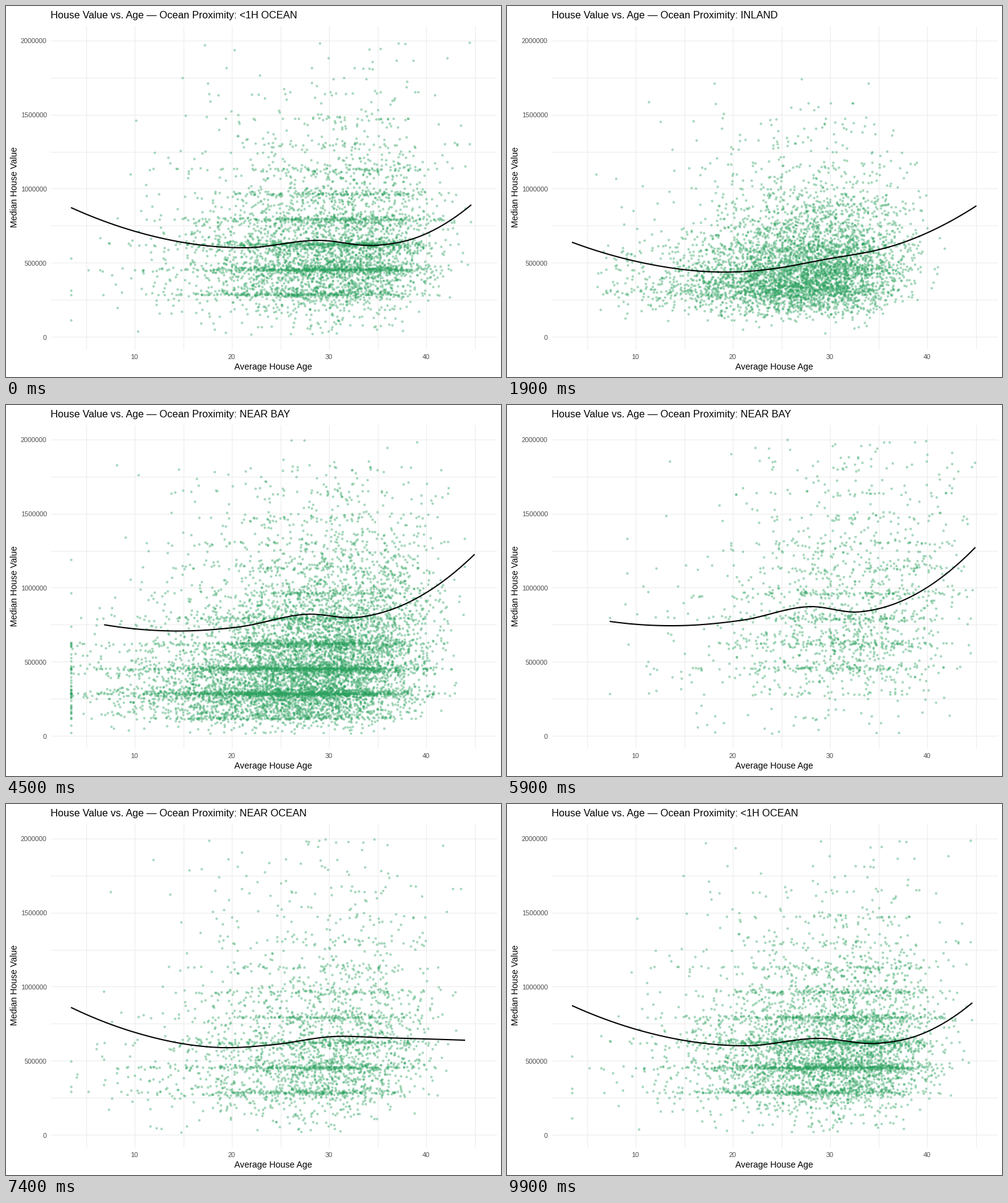
Write a matplotlib script that moves like this. It is 800x600 px and loops after 10000 ms.

```python
import numpy as np
import matplotlib.pyplot as plt
from matplotlib.animation import FuncAnimation

plt.rcParams["font.family"] = ["Liberation Sans", "DejaVu Sans"]

W, H, DPI = 800, 600, 100
PX = 72 / DPI
FRAMES, INTERVAL = 100, 100
LEFT, RIGHT, TOP, BOTTOM = 72, 793, 32, 555
GREEN = (0.173, 0.635, 0.373, 0.33)
rng = np.random.default_rng(12)


def px_x(age):
    return 50.5 + 15.69 * age


def px_y(thousands):
    return 533.6 - 0.2391 * thousands


def smooth(xs, ys, n=80):
    """Cubic Hermite curve through a few key points."""
    xs, ys = np.array(xs, float), np.array(ys, float)
    x = np.linspace(xs[0], xs[-1], n)
    i = np.clip(np.searchsorted(xs, x) - 1, 0, len(xs) - 2)
    m, h = np.gradient(ys, xs, edge_order=2), xs[i + 1] - xs[i]
    u = (x - xs[i]) / h
    y = ((1 + 2 * u) * (1 - u) ** 2 * ys[i] + u * (1 - u) ** 2 * h * m[i]
         + u * u * (3 - 2 * u) * ys[i + 1] + u * u * (u - 1) * h * m[i + 1])
    return np.column_stack([x, y])


def cloud(count, x_min, x_max, age, age_sd, median, sigma):
    """Ages lean to the left; log-normal values gather in horizontal bands."""
    value = median * np.exp(sigma * rng.normal(size=count))
    value -= 22 * np.sin(2 * np.pi * (value - 440) / 170)
    value *= np.where(rng.random(count) < 0.05, rng.random(count), 1)
    value = 10 + np.abs(1990 - np.abs(1990 - value))
    ages = age + age_sd * (9 - rng.gamma(9, size=count)) / 3
    ages += 2 * np.log(np.clip(value / median, 0.4, 2))
    x = np.maximum(x_max - np.abs(x_max - px_x(ages)), x_min)
    return np.column_stack([x, px_y(value)])


def state(name, xs, ys, count, **spread):
    return name, cloud(count, xs[0], xs[-1], **spread), smooth(xs, ys)


STATES = [
    state("<1H OCEAN",
          [105, 207, 385, 505, 600, 665, 752], [326, 364, 391, 379, 387, 374, 321.5],
          count=4800, age=29.5, age_sd=6.4, median=560, sigma=0.46),
    state("INLAND",
          [105, 207, 350, 430, 521, 640, 760], [394, 423, 439, 433, 415, 383, 323.5],
          count=8800, age=26, age_sd=7.4, median=400, sigma=0.57),
    state("NEAR BAY",
          [166, 265, 380, 490, 570, 640, 757], [350, 357, 348, 326, 334.5, 316, 230],
          count=1600, age=31, age_sd=6.6, median=800, sigma=0.46),
    state("NEAR OCEAN",
          [105, 207, 350, 430, 530, 610, 742], [329, 369, 394, 389.5, 376, 378, 382],
          count=2750, age=28, age_sd=6.7, median=560, sigma=0.54),
]
MOVES = [(8, 25), (34, 50), (58, 74), (83, 99)]

fig = plt.figure(figsize=(W / DPI, H / DPI), dpi=DPI, facecolor="white")
ax = fig.add_axes([0, 0, 1, 1], xlim=(0, W), ylim=(H, 0))
ax.axis("off")


def label(x, y, text, size, **style):
    return ax.text(x, y, text, fontsize=size * PX, **{"va": "baseline", **style})


def grid_line(xs, ys):
    ax.plot(xs, ys, color="#EBEBEB", lw=PX, zorder=1, solid_capstyle="butt")


for age in range(5, 50, 5):
    x = round(px_x(age)) + 0.5
    grid_line([x, x], [TOP, BOTTOM])
    if age % 10 == 0:
        label(x, 571, str(age), 11, ha="center", color="#4D4D4D")
for value in range(0, 2001, 250):
    y = round(px_y(value)) + 0.5
    grid_line([LEFT, RIGHT], [y, y])
    if value % 500 == 0:
        label(66, y + 5, str(value * 1000), 10.9, ha="right", color="#4D4D4D")

label(432, 588, "Average House Age", 14.1, ha="center")
label(14, 293, "Median House Value", 14.1, ha="center", va="center", rotation=90)
title = label(LEFT, 20, "", 16.4)

dots, = ax.plot([], [], "o", ms=3.1 * PX, mew=PX, mfc=GREEN, mec=GREEN, zorder=2)
trend, = ax.plot([], [], color="black", lw=2 * PX, zorder=3, solid_capstyle="butt")


def ease(p):
    return 4 * p ** 3 if p < 0.5 else 1 - 4 * (1 - p) ** 3


def pose(frame):
    """Title, points and curve; leavers stay and newcomers wait until a move ends."""
    for i, (start, end) in enumerate(MOVES):
        name, pts, curve = STATES[i]
        if frame <= start:
            return name, pts, curve
        if frame < end:
            next_name, next_pts, next_curve = STATES[(i + 1) % len(STATES)]
            p = (frame - start) / (end - start)
            k, n = ease(p), min(len(pts), len(next_pts))
            moving = pts[:n] + k * (next_pts[:n] - pts[:n])
            return (name if p <= 0.5 else next_name,
                    np.vstack([moving, pts[n:]]),
                    curve + k * (next_curve - curve))
    return STATES[0]


def update(frame):
    name, pts, curve = pose(frame)
    title.set_text("House Value vs. Age \u2014 Ocean Proximity: " + name)
    dots.set_data(pts[:, 0], pts[:, 1])
    trend.set_data(curve[:, 0], curve[:, 1])
    return title, dots, trend


anim = FuncAnimation(fig, update, frames=FRAMES, interval=INTERVAL,
                     repeat=True, repeat_delay=0)
plt.show()
```
